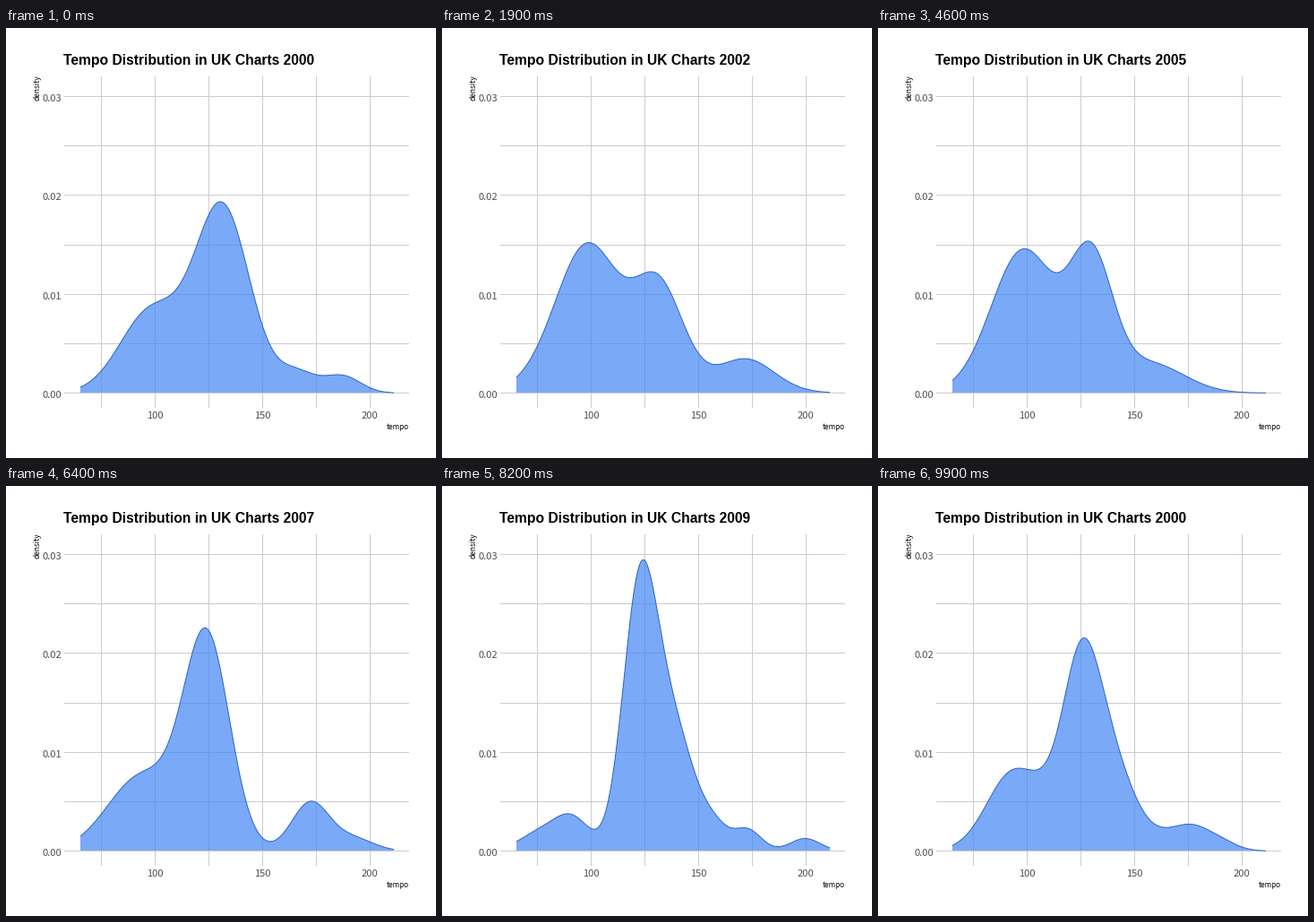
These frames come from a looping animation (480 px wide and 480 px high, 10 s). A matplotlib script:

```python
import matplotlib.pyplot as plt
import numpy as np
from matplotlib.animation import FuncAnimation

SIZE, DPI = 480, 100
PX = 72 / DPI
BASE, UNIT = 407, 110.33          # pixel row of zero, pixels per 0.01
LEFT, RIGHT = 83, 433
GRID, BLUE, EDGE, GREY = "#cccccc", "#4285f4", "#2a64c8", "#4d4d4d"

# Each density is a sum of bell curves: (tempo, spread, peak in pixels)
BUMPS = {
    2000: [(98, 14.3, 91), (131.2, 12.8, 207), (166, 8.7, 22), (187, 8.5, 19)],
    2001: [(98.8, 13.7, 181), (130.9, 11, 139), (172, 11.8, 33)],
    2003: [(97, 17, 151), (132.3, 12.6, 94), (171.5, 15, 43)],
    2005: [(98.3, 15, 160), (129.8, 10, 143), (157, 16, 33)],
    2007: [(94, 16, 84), (124, 10.7, 234), (172.2, 8.7, 54), (192, 9.5, 14)],
    2009: [(77, 10, 21), (91.5, 8, 33), (122.3, 7.8, 255), (136.5, 11, 145),
           (158, 6, 17), (172.5, 6.5, 24), (199.5, 7, 14)],
    2010: [(89.5, 10, 105), (124.5, 7.7, 345), (150, 7, 30), (176.5, 7, 60)],
}

xs = np.linspace(LEFT, RIGHT, 2 * (RIGHT - LEFT) + 1)
tempo = 100 + (xs - 166.5) / 2.4
curves = {year: sum(peak * np.exp(-((tempo - mid) / spread) ** 2 / 2)
                    for mid, spread, peak in bumps)
          for year, bumps in BUMPS.items()}
for year in (2002, 2004, 2006, 2008):
    curves[year] = (curves[year - 1] + curves[year + 1]) / 2

YEARS = list(range(2000, 2011))
STARTS = [5, 15] + list(range(25, 98, 9))
STEPS = [5, 5] + [4] * 9

fig = plt.figure(figsize=(SIZE / DPI, SIZE / DPI), dpi=DPI, facecolor="white")
ax = fig.add_axes([0, 0, 1, 1])
ax.set_xlim(0, SIZE)
ax.set_ylim(SIZE, 0)
ax.axis("off")


def label(x, y, text, size, **style):
    style = {"family": "Noto Sans CJK JP", "color": "black", **style}
    return ax.text(x, y, text, fontsize=size * PX, **style)


for k in range(7):
    y = BASE - k * UNIT / 2
    ax.plot([65, 449], [y, y], color=GRID, lw=PX, zorder=1)
    if k % 2 == 0:
        label(62, y + 6, f"{k / 200:.2f}", 11.1, color=GREY, ha="right")
for k in range(6):
    x = 106 + 60 * k
    ax.plot([x, x], [54, 423], color=GRID, lw=PX, zorder=1)
    if k % 2:
        label(x, 436.5, str(75 + 25 * k), 11.1, color=GREY, ha="center")

label(450, 448.5, "tempo", 8.1, ha="right")
label(39.5, 52.5, "density", 8.4, rotation=90, ha="right", va="top")
title = label(64.5, 41.5, "", 15.6, family="Liberation Sans", weight="bold")
area, = ax.fill([0, 0, 0], [0, 0, 0], color=BLUE, alpha=0.7, lw=0, zorder=2)
outline, = ax.plot([], [], color=EDGE, lw=PX, zorder=3,
                   solid_capstyle="butt")


def state(frame):
    """Year to show and curve heights at a frame."""
    year, heights = YEARS[0], curves[YEARS[0]]
    for k, (start, steps) in enumerate(zip(STARTS, STEPS)):
        if frame < start:
            break
        old, new = YEARS[k], YEARS[(k + 1) % len(YEARS)]
        p = min((frame - start + 1) / steps, 1)
        heights = (1 - p) * curves[old] + p * curves[new]
        year = new if p >= 0.5 else old
    return year, heights


def draw(frame):
    year, heights = state(frame)
    ys = BASE + 0.5 - heights
    area.set_xy(np.column_stack([np.r_[xs, RIGHT, LEFT],
                                 np.r_[np.minimum(ys, BASE), BASE, BASE]]))
    outline.set_data(xs, ys)
    title.set_text(f"Tempo Distribution in UK Charts {year}")
    return area, outline, title


anim = FuncAnimation(fig, draw, frames=100, interval=100,
                     repeat=True, repeat_delay=0)
plt.show()
```
